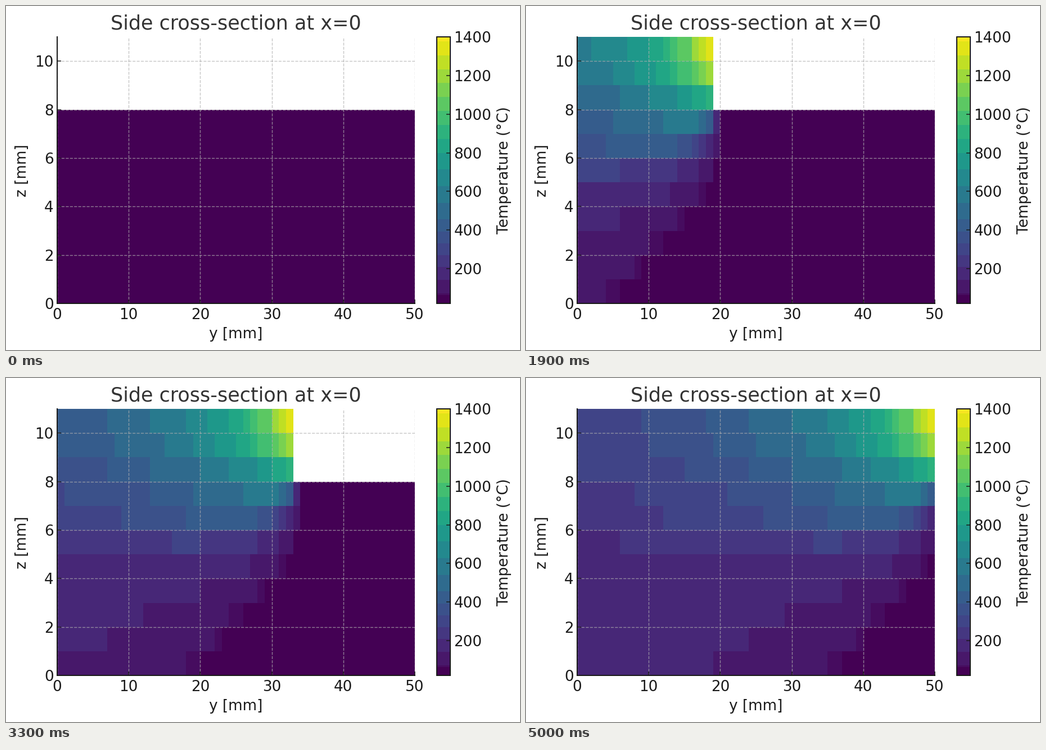
Write a matplotlib script that moves like this. It is 914 px wide and 613 px high and loops after 5.1 s.

```python
import numpy as np
import matplotlib
import matplotlib.pyplot as plt
from matplotlib.animation import FuncAnimation
from matplotlib.colors import BoundaryNorm, ListedColormap

W, H, DPI = 914, 613, 100
COLS, ROWS, PLATE = 50, 11, 8
T_MIN, T_MAX = 20, 1400
INK = "#1a1a1a"

plt.rcParams["font.family"] = "DejaVu Sans"

# Colour bands of the temperature scale, as fractions of its range
EDGES = np.interp(np.arange(22), [0, 1, 2, 4, 8, 12, 15, 20, 21],
                  [0, .032, .038, .137, .315, .565, .722, .983, 1])
MIDS = (EDGES[1:] + EDGES[:-1]) / 2
BANDS = ListedColormap(matplotlib.colormaps["viridis"](np.r_[0, MIDS[1:]]))
BANDS.set_bad((1, 1, 1, 0))
NORM = BoundaryNorm(EDGES, BANDS.N)

# Cooling offset and warm-up time by height, in column steps
row = np.arange(ROWS)[:, None]
col = np.arange(COLS)[None, :]
KEYS = [0, 2, 4, 6, 7, 8, 9, 10]
offset = np.interp(row, KEYS, [75, 70, 60, 28, 24, 18, 12.8, 11.5])
warm_up = np.interp(row, KEYS[:6], [26.3, 21, 10.1, 4.5, 1.8, 0.1])
power = 1 + 0.023 * np.maximum(PLATE - 1 - row, 0) ** 2


def pt(px):
    return px * 72 / DPI


def field(front):
    """Relative temperature when the bead has reached the given column."""
    age = front - col
    # columns next to the left edge cool a little faster
    lead = 0.74 * np.sqrt(np.maximum(age - 1, 0)) - 0.66 * col - 0.3
    # and plate cells there warm up later
    eff = age - np.maximum(lead, 0)
    cooling = 12 / (np.maximum(eff, 0) + offset)
    rise = 1 - np.exp(-(np.maximum(eff + 0.5, 0) / warm_up) ** power)
    heat = cooling * rise * (front > 0)
    return np.ma.masked_where((row >= PLATE) & (age <= 0), heat)


def add_axes(x0, y0, x1, y1):
    return fig.add_axes([x0 / W, 1 - y1 / H, (x1 - x0) / W, (y1 - y0) / H])


def label(x, y, text, size, color=INK, rotation=0):
    fig.text(x / W, 1 - y / H, text, fontsize=pt(size), color=color,
             ha="center", va="baseline", rotation=rotation,
             rotation_mode="anchor")


fig = plt.figure(figsize=(W / DPI, H / DPI), dpi=DPI, facecolor="white")

ax = add_axes(91, 55, 727, 530)
image = ax.imshow(field(0), cmap=BANDS, norm=NORM, origin="lower",
                  extent=(0, COLS, 0, ROWS), aspect="auto",
                  interpolation="nearest")
ax.set_xticks(range(0, 51, 10))
ax.set_yticks(range(0, 11, 2))
ax.grid(True, color="#b0b0b0", alpha=0.7, linestyle="--", linewidth=pt(1.4))
ax.spines[["top", "right"]].set_visible(False)

bar = add_axes(766.4, 55, 790.2, 530)
bar.pcolormesh([0, 1], T_MIN + EDGES * (T_MAX - T_MIN), MIDS[:, None],
               cmap=BANDS, norm=NORM)
bar.set_xticks([])
bar.set_yticks(range(200, 1401, 200))
bar.yaxis.tick_right()

for axes in (ax, bar):
    axes.tick_params(direction="in", length=pt(7), width=pt(1.5), color=INK,
                     labelcolor=INK, labelsize=pt(26.3), pad=pt(6.3))
    for spine in axes.spines.values():
        spine.set(color=INK, linewidth=pt(2))
ax.tick_params(axis="x", pad=pt(7.5))

label(409, 42, "Side cross-section at x=0", 35, "#333333")
label(409, 592, "y [mm]", 26.3)
label(36, 293, "z [mm]", 26.3, rotation=90)
label(893, 293, "Temperature (°C)", 26.3, rotation=90)


def update(front):
    image.set_data(field(front))
    return [image]


anim = FuncAnimation(fig, update, frames=COLS + 1, interval=100, repeat=True)
plt.show()
```
